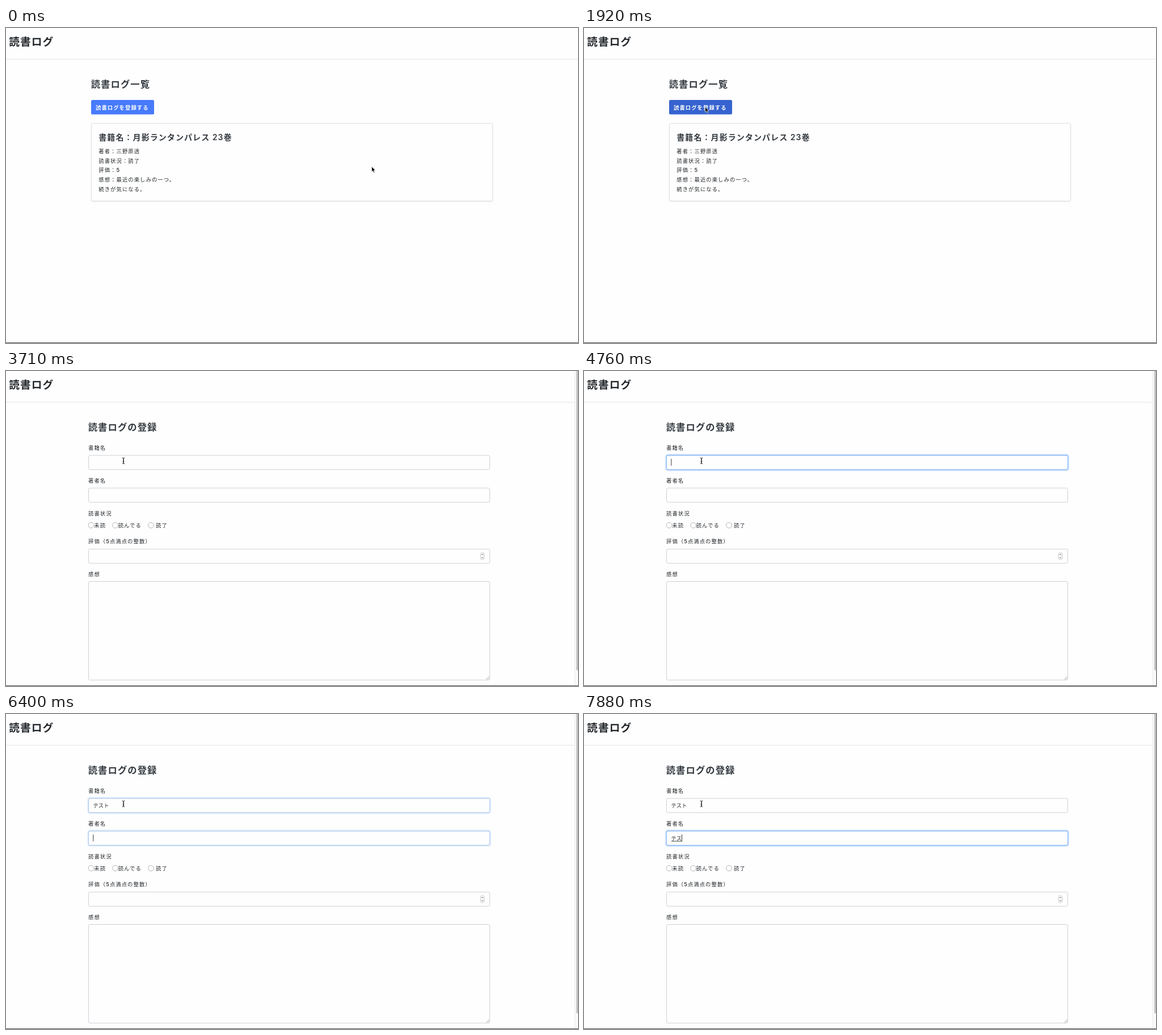
Recreate the animation shown at these times as an HTML page. Size 1008 by 556 pixels, loop 8 s.

```html
<!DOCTYPE html>
<html lang="ja">
<head>
<meta charset="utf-8">
<title>読書ログ</title>
<style>
  html, body { margin: 0; width: 100%; height: 100%; overflow: hidden; background: #fefefe; }
  svg { display: block; width: 1008px; height: 556px; }
  text {
    font-family: Inter, "Noto Sans CJK JP", "Noto Sans CJK", sans-serif;
    letter-spacing: 1.07px;
    fill: #24282c;
    white-space: pre;
  }
  .tight { letter-spacing: 0; }
  .box { fill: #fefefe; stroke: #cdd1d6; }
  .ring { fill: none; stroke: #0d6efd; stroke-opacity: .22; stroke-width: 2.4; }
  .edge { fill: none; stroke: #86b9fb; }
  .arrow { fill: #000; stroke: #fff; stroke-width: .7; stroke-linejoin: round; }
  .hand { fill: #fff; stroke: #111; stroke-width: .9; stroke-linejoin: round; }
  .beam { fill: none; stroke: #222; stroke-width: 1; }
  .card { filter: drop-shadow(0 1px 1px rgba(0, 0, 0, .075)); }
  .popup { filter: drop-shadow(0 1px 2.5px rgba(0, 0, 0, .35)); }
</style>
</head>
<body>
<svg id="stage" viewBox="0 0 1008 556"></svg>
<script>
const LOOP = 8000;
const EM = 9.33;

// Text placed by the vertical centre of its glyphs
const text = (x, y, str, size = EM, weight = 500, extra = '') =>
  `<text x="${x}" y="${y + size * .38}" font-size="${size}" font-weight="${weight}" ${extra}>${str}</text>`;
const rect = (x, y, w, h, extra = '') =>
  `<rect x="${x}" y="${y}" width="${w}" height="${h}" ${extra}/>`;
const box = (y, h) => rect(145.5, y, 707, h, 'rx="2.5" class="box"');
const radio = (x, labelX, label) =>
  `<circle cx="${x}" cy="272.3" r="4.9" fill="#fff" stroke="#aaa" stroke-width=".9"/>` + text(labelX, 272.5, label);

// Focusable field: glow, typed text, composition underline and caret
const field = (id, y) => box(y, 25) + `
  <g id="${id}">
    <g class="glow">${rect(144.3, y - 1.2, 709.4, 27.4, 'rx="3.5" class="ring"')}
      ${rect(145.5, y, 707, 25, 'rx="2.5" class="edge"')}</g>
    ${text(153.5, y + 12.5, '', EM, 400, 'class="tight"')}
    ${rect(154, y + 17.3, 0, .8, 'class="under" fill="#222"')}
    ${rect(153.4, y + 6, .9, 12, 'class="caret" fill="#222"')}
  </g>`;

const listPage = `<g id="list">
  ${text(149.7, 98.3, '読書ログ一覧', 16.33, 600, 'style="fill:#343a40"')}
  ${rect(150, 127, 111, 25.6, 'rx="2.6" id="button"')}
  ${text(158, 140, '読書ログを登録する', EM, 600, 'style="fill:#fff"')}
  ${rect(150.5, 168.3, 707, 137, 'rx="2.6" class="card" fill="#fefefe" stroke="#dedede"')}
  ${text(163.3, 193, '書籍名：月影ランタンパレス 23巻', 14, 600, 'style="fill:#343a40"')}
  ${['著者：三野原透', '読書状況：読了', '評価：5', '感想：最近の楽しみの一つ。', '続きが気になる。']
    .map((line, i) => text(163.3, 217.7 + i * 16.6, line)).join('')}
</g>`;

const formPage = `<g id="form">
  ${rect(1002, 0, 6, 555, 'fill="#fafafa"')}
  ${rect(1002, 0, 1, 555, 'fill="#e8e8e8"')}
  ${rect(1005, -6, 6, 534.5, 'rx="2" fill="#c1c1c1"')}
  ${text(144.7, 98.3, '読書ログの登録', 16.33, 600, 'style="fill:#343a40"')}
  ${text(145, 135.5, '書籍名')}
  ${field('title', 149)}
  ${text(145, 193.2, '著者名')}
  ${field('author', 206.7)}
  ${text(145, 251, '読書状況')}
  ${radio(150, 155.3, '未読')}${radio(192.6, 197.7, '読んでる')}${radio(255.5, 264, '読了')}
  ${text(145, 300.7, '評価（5点満点の整数）')}
  ${box(314.3, 25)}
  ${rect(836.2, 320.5, 6.6, 12.6, 'rx="3" fill="#fff" stroke="#bbb" stroke-width=".8"')}
  <path d="M837.8 325l1.7-2 1.7 2M837.8 328.6l1.7 2 1.7-2" fill="none" stroke="#555" stroke-width=".9"/>
  ${text(145, 358.2, '感想')}
  ${box(371.5, 174)}
  <path d="M846.5 544.5l5-5M849.3 544.5l2.2-2.2" stroke="#888" stroke-width=".8"/>
  <g id="popup">
    ${rect(150, 171, 140.6, 100.5, 'rx="2.5" class="popup" fill="#fefefe"')}
    ${rect(281, 171.5, .8, 86, 'fill="#e2e2e2"')}
    ${rect(283.4, 236.5, 5, 19, 'rx="2.5" fill="#bfbfbf"')}
    ${text(153.7, 180, 'テスと', 9.6, 700, 'class="tight" style="fill:#000"')}
    ${text(164.5, 264.5, 'スペースバーまたはTabキーを押して選択', 5.9, 400, 'class="tight" style="fill:#777"')}
    ${text(278.8, 264.5, '»', 7.5, 500, 'class="tight" style="fill:#666"')}
  </g>
</g>`;

const pointers = `
  <path id="arrow" class="arrow" d="M.4.4V9.8L2.5 7.9 4 11.4 5.6 10.7 4.1 7.3H6.8Z"/>
  <path id="hand" class="hand" d="M3.2 7V1.4Q3.9 0 4.7 1.4V4.6Q5.6 3.8 6.4 4.9 7.3 4.2 8 5.2 9.5 4.5 9.8 6.2 10 9 8.6 11.5H4Q2.6 9.2.9 7.3.8 5.9 2 6.1Z"/>
  <path id="beam" class="beam" d="M-2.2-5.3Q0-5.3 0-4V4Q0 5.3-2.2 5.3M2.2-5.3Q0-5.3 0-4V4Q0 5.3 2.2 5.3M-1.2 1.5H1.2"/>`;

document.getElementById('stage').innerHTML =
  rect(0, 0, 1008, 556, 'fill="#fefefe"') +
  rect(0, 54.6, 1008, 1, 'fill="#e2e4e7"') +
  text(5.3, 23.7, '読書ログ', 18.67, 700) +
  listPage + formPage +
  rect(0, 555, 1008, 1, 'fill="#4c4c4c"') + pointers;

// Pointer glide in six eased steps
const glide = [140, 290, 440, 590, 730, 880].map((time, i) => {
  const u = (i + 1) / 6, e = u * u * (3 - 2 * u);
  return [time, 'arrow', 644 - 427 * e, 244 - 104.5 * e];
});

// Each row: start time, then values held until the next row
const pointer = [[0, 'arrow', 644, 244], ...glide, [1470, 'hand', 210.3, 139.3],
  [1920, 'arrow', 213, 138.6], [3420, 'arrow', 211, 145], [3570, 'beam', 207, 158.5]];
const buttonFill = [[0, '#477bfc'], [1470, '#3e6fe4'], [1620, '#3663cf']];
const page = [[0, 'list'], [2970, 'form']];
const popup = [[0, false], [5950, true], [6100, false]];

// Rows: time, glow, text, caret, underline
const fields = {
  title: [[0, 0, '', 0, 0], [3720, .5, '', 0, 0], [3860, 1, '', 1, 0], [4310, 1, '', 0, 0],
    [4760, 1, '', 1, 0], [5050, 1, 'テ', 1, 1], [5350, 1, 'テs', 1, 1], [5500, 1, 'テス', 1, 1],
    [5650, 1, 'テスト', 1, 1], [6100, 1, 'テスト', 1, 0], [6400, .5, 'テスト', 0, 0], [6540, 0, 'テスト', 0, 0]],
  author: [[0, 0, '', 0, 0], [6400, .5, '', 1, 0], [6540, 1, '', 1, 0], [6990, 1, '', 0, 0],
    [7290, 1, 't', 1, 1], [7440, 1, 'テ', 1, 1], [7580, 1, 'テs', 1, 1], [7880, 1, 'テス', 1, 1]]
};

const at = (rows, t) => rows.filter(row => row[0] <= t).pop().slice(1);
const el = id => document.getElementById(id);
const show = (node, on) => { node.style.display = on ? '' : 'none'; };
const widthOf = str => [...str].reduce((sum, c) => sum + (c < '~' ? (c === 't' ? 3.5 : 4.9) : EM), 0);

function drawField(id, t) {
  const [glow, str, caret, under] = at(fields[id], t);
  const part = name => el(id).querySelector(name);
  const width = widthOf(str);
  part('.glow').style.opacity = glow;
  if (part('text').textContent !== str) part('text').textContent = str;
  part('.under').setAttribute('width', under ? width : 0);
  part('.caret').setAttribute('x', 153.4 + width);
  show(part('.caret'), caret);
}

function draw(t) {
  const [shape, x, y] = at(pointer, t);
  for (const id of ['arrow', 'hand', 'beam']) show(el(id), id === shape);
  el(shape).setAttribute('transform', `translate(${x} ${y})`);
  el('button').setAttribute('fill', at(buttonFill, t)[0]);
  const [current] = at(page, t);
  show(el('list'), current === 'list');
  show(el('form'), current === 'form');
  show(el('popup'), at(popup, t)[0]);
  drawField('title', t);
  drawField('author', t);
}

const start = performance.now();
function tick() {
  draw((performance.now() - start) % LOOP);
  requestAnimationFrame(tick);
}
tick();
</script>
</body>
</html>
```
